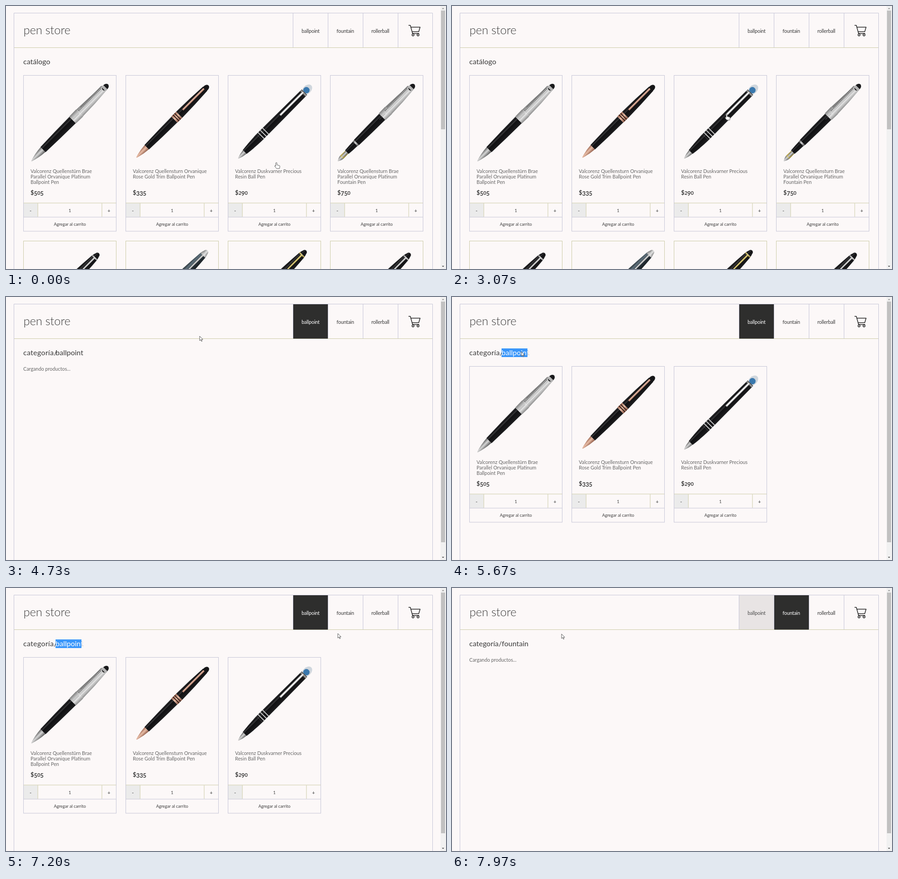
Write an HTML page that moves like this. It is 968 by 578 pixels and loops after 8000 ms.

```html
<!DOCTYPE html>
<html lang="es">
<head>
<meta charset="utf-8">
<title>pen store</title>
<style>
  html, body { margin: 0; width: 100%; height: 100%; overflow: hidden; background: #fcf8f8; }
  svg { display: block; width: 968px; height: 578px; }
  text { font-family: Lato, "Open Sans", sans-serif; fill: #3c3c3c; }
  .logo { font-size: 25.6px; font-weight: 300; letter-spacing: -.1px; }
  .heading { font-size: 16px; }
  .nav { font-size: 11px; letter-spacing: -.25px; text-anchor: middle; }
  .on text { fill: #fff; }
  .body { font-size: 10.8px; fill: #666; }
  .price { font-size: 12.8px; font-weight: 700; }
  .small { font-size: 9.4px; text-anchor: middle; }
  .sign { font-size: 11px; text-anchor: middle; }
  .line { fill: none; stroke: #c5c5d6; }
  .olive { stroke: #cccba6; }

  .anim { animation: 8s linear infinite; }
  .step { animation: 8s step-end infinite; }

  .catalog { animation-name: catalog; }
  .products { animation-name: products; }
  .loading { animation-name: loading; }
  .category { animation-name: category; }
  .selection { animation-name: selection; }
  .fountain-title { animation-name: fountain-title; }
  .ballpoint { animation-name: ballpoint; }
  .fountain { animation-name: fountain; }
  .thumb { animation-name: thumb; }
  .hand { animation-name: hand; }
  .arrow { animation-name: arrow; }
  .cursor { animation: move 8s ease-in-out infinite; }

  @keyframes catalog { 0% { opacity: 1 } 59.125%, 100% { opacity: 0 } }
  @keyframes products { 0%, 63.75% { opacity: 1 } 59.125%, 96.25%, 100% { opacity: 0 } }
  @keyframes loading { 0%, 63.75% { opacity: 0 } 59.125%, 96.25%, 100% { opacity: 1 } }
  @keyframes category { 0%, 96.25%, 100% { opacity: 0 } 59.125% { opacity: 1 } }
  @keyframes selection { 0%, 96.25%, 100% { opacity: 0 } 70% { opacity: 1 } }
  @keyframes fountain-title { 0% { opacity: 0 } 96.25%, 100% { opacity: 1 } }
  @keyframes ballpoint { 0%, 48.69% { opacity: 0 } 52.44%, 96.25% { opacity: 1 } 100% { opacity: 0 } }
  @keyframes fountain { 0%, 91% { opacity: 0 } 94.75%, 100% { opacity: 1 } }
  @keyframes thumb { 0% { height: 261px } 59.125%, 100% { height: 529px } }
  @keyframes hand { 0%, 48.69%, 91% { opacity: 1 } 42.5%, 59.125%, 96.25%, 100% { opacity: 0 } }
  @keyframes arrow { 0%, 48.69%, 91% { opacity: 0 } 42.5%, 59.125%, 96.25%, 100% { opacity: 1 } }
  @keyframes move {
    0% { transform: translate(595px, 344px) }
    7.5% { transform: translate(592px, 338px) }
    12.5%, 25.375% { transform: translate(589px, 333px) }
    34.6%, 35.9% { transform: translate(604px, 262px) }
    45.9%, 46.6% { transform: translate(606px, 70px) }
    49.625% { transform: translate(641px, 53px) }
    52.9%, 55% { transform: translate(664px, 50px) }
    55.4%, 59.12% { transform: translate(661px, 52px) }
    59.125% { transform: translate(426px, 86px) }
    69.1%, 70% { transform: translate(142px, 119px) }
    75.4%, 78.75% { transform: translate(330px, 138px) }
    85.9%, 88.4% { transform: translate(612px, 142px) }
    90% { transform: translate(730px, 100px) }
    92.5%, 95.5% { transform: translate(746px, 50px) }
    99.6%, 100% { transform: translate(241px, 101px) }
  }
</style>
</head>
<body>
<svg viewBox="0 0 968 578">
  <defs>
    <linearGradient id="silver" x2="0" y2="1">
      <stop offset="0" stop-color="#7c7c7c"/><stop offset=".3" stop-color="#bdbdbd"/>
      <stop offset=".6" stop-color="#e4e4e4"/><stop offset="1" stop-color="#8a8a8a"/>
    </linearGradient>
    <linearGradient id="steel" x2="0" y2="1">
      <stop offset="0" stop-color="#5c5c5c"/><stop offset=".45" stop-color="#d6d6d6"/>
      <stop offset="1" stop-color="#555"/>
    </linearGradient>
    <linearGradient id="ink" x2="0" y2="1">
      <stop offset="0" stop-color="#2b2b2d"/><stop offset=".2" stop-color="#141416"/>
      <stop offset=".3" stop-color="#3a3a3c"/><stop offset=".42" stop-color="#101012"/>
      <stop offset="1" stop-color="#1d1d1f"/>
    </linearGradient>
    <linearGradient id="rose" x2="0" y2="1">
      <stop offset="0" stop-color="#9a6450"/><stop offset=".45" stop-color="#e9bda6"/>
      <stop offset="1" stop-color="#8a5644"/>
    </linearGradient>
    <linearGradient id="gold" x2="0" y2="1">
      <stop offset="0" stop-color="#a89440"/><stop offset=".5" stop-color="#e4d68c"/>
      <stop offset="1" stop-color="#877426"/>
    </linearGradient>
    <linearGradient id="marble" x2="0" y2="1">
      <stop offset="0" stop-color="#1e2428"/><stop offset=".3" stop-color="#5f717c"/>
      <stop offset=".55" stop-color="#28333b"/><stop offset="1" stop-color="#16191c"/>
    </linearGradient>
  </defs>

  <rect width="968" height="578" fill="#fcf8f8"/>
  <path class="line" d="M17.500 578V15.500H938.500V578M631.500 16V91M708.500 16V91M785.500 16V91M862.500 16V91"/>
  <path class="line olive" d="M18 91.500H938"/>
  <text class="logo" x="38.500" y="62">pen store</text>
  <text class="nav" x="670" y="58.500">ballpoint</text>
  <text class="nav" x="746.500" y="58.500">fountain</text>
  <text class="nav" x="823.500" y="58.500">rollerball</text>
  <g class="on anim ballpoint">
    <rect x="632" y="16" width="76" height="75.500" fill="#2e2e2d"/>
    <text class="nav" x="670" y="58.500">ballpoint</text>
  </g>
  <g class="on anim fountain">
    <rect x="709" y="16" width="76" height="75.500" fill="#2e2e2d"/>
    <text class="nav" x="746.500" y="58.500">fountain</text>
  </g>
  <g fill="none" stroke="#222" stroke-width="1.500" stroke-linejoin="round">
    <path d="M885.500 42.500H889.500L894.500 60.500H909M890.800 46.500H911L908 56.500H893.500"/>
    <circle cx="895.500" cy="63.500" r="2.200"/><circle cx="906.500" cy="63.500" r="2.200"/>
  </g>

  <text class="heading step catalog" x="38" y="128">catálogo</text>
  <g class="step category">
    <text class="heading" x="38" y="128" letter-spacing=".3">categoría/</text>
    <text class="heading" x="109" y="128">ballpoint</text>
  </g>
  <g class="on step selection">
    <rect x="109" y="113" width="57" height="19" fill="#3a96fa"/>
    <text class="heading" x="109" y="128">ballpoint</text>
  </g>
  <text class="heading step fountain-title" x="38" y="128">categoría/fountain</text>
  <text class="body step loading" x="38" y="162">Cargando productos...</text>

  <g id="products" class="step products"></g>
  <g id="rest" class="step catalog"></g>

  <rect x="956" width="12" height="578" fill="#f1f1f1"/>
  <rect class="step thumb" x="957" y="10" width="9" height="261" fill="#c1c1c1"/>
  <path d="M959 6.500L961.500 4L964 6.500Z" fill="#888"/>
  <path d="M959 571L961.500 573.500L964 571Z" fill="#444"/>

  <g class="cursor" fill="#fff" stroke="#333" stroke-width=".8" stroke-linejoin="round">
    <path class="step hand" d="M-1.500 .8Q-.2 -.8 1.100 .8V5.300L6.100 6.500Q7.700 7 7.500 8.800L6.700 13.200H.2L-3.800 8.200Q-4.200 6.600 -2.600 6.900L-1.500 7.900Z"/>
    <path class="step arrow" d="M0 0V10L2.400 7.800L4.100 11.600L5.600 10.900L3.900 7.300H7.100Z"/>
  </g>
</svg>
<script>
const paint = name => name[0] === '#' ? name : `url(#${name})`;

// A pen lies along the x axis, tip at 0: [start, end, half width at start, at end, paint].
// Sides bulge slightly outwards.
const part = ([a, b, h, k, fill]) => {
  const mid = (a + b) / 2, bulge = .3 * (h + k) / 2 + .7 * Math.max(h, k);
  return `<path d="M${a} ${-h}Q${mid} ${-bulge} ${b} ${-k}V${k}Q${mid} ${bulge} ${a} ${h}Z" fill="${paint(fill)}"/>`;
};
const bar = (a, b, v, width, color, dash = '') =>
  `<path d="M${a} ${v}H${b}" stroke="${color}" stroke-width="${width}" stroke-dasharray="${dash}"/>`;
const dome = (x, rx, ry, color) =>
  `<ellipse cx="${x}" cy="0" rx="${rx}" ry="${ry}" fill="${color}"/>`;
const pen = (x, y, parts, extra = '') =>
  `<g transform="translate(${x} ${y}) rotate(-45)">${parts.map(part).join('')}${extra}</g>`;

const blackEnd = dome(230, 8.5, 6.2, '#1a1a1c');
const engraved = bar(152, 222, -5, 3, '#666', '1.5 2') + bar(152, 222, 0, 1.2, '#999', '1 2') +
  bar(152, 222, 4, 1.2, '#aaa', '1 2') + bar(130, 148, 0, 1, '#888', '1 1') +
  bar(160, 226, -7.5, 2, '#777') + bar(224, 230, 0, 13, '#b4b4b4');

const pens = {
  platinum: pen(17.5, 188.5, [
    [0, 36, .8, 7.5, 'steel'], [36, 128, 8, 10, 'ink'],
    [128, 150, 10.5, 11, 'silver'], [150, 229, 10.5, 6.5, 'silver']], blackEnd + engraved),
  rose: pen(23.5, 180.5, [
    [0, 32, .8, 6.5, 'rose'], [32, 118, 7, 9, 'ink'], [118, 133, 9.5, 9.5, 'rose'],
    [133, 214, 9.5, 6.5, 'ink']],
    bar(122, 130, 0, 19, '#33201b', '2 3') + dome(216, 8, 6, '#161618') +
    bar(146, 212, -2, 4, '#b98470') + bar(148, 212, -2.5, 1.2, '#f0cdbb')),
  resin: pen(22.5, 182.5, [
    [0, 20, .8, 5.5, 'steel'], [20, 66, 6, 9.5, 'ink'], [66, 204, 9.5, 8.5, 'ink']],
    bar(70, 87, 0, 19, '#ccc', '2 5') + dome(214, 13, 9, '#cfd6dd') +
    dome(212, 7, 7, '#3a78ad') + bar(200, 206, 0, 17, '#555') + bar(202, 204, 0, 17, '#aaa') +
    bar(132, 205, -2, 5, '#777') + bar(133, 204, -2, 3.4, '#eee')),
  fountain: pen(16.5, 188.5, [
    [0, 12, .5, 5, 'steel'], [12, 28, 5, 4.5, 'gold'], [14, 28, 2, 3.5, 'steel'],
    [28, 54, 5.5, 7, 'ink'], [54, 58, 7.5, 7.5, 'steel'], [58, 138, 8, 9.5, 'ink'],
    [138, 158, 10.5, 11, 'silver'], [158, 229, 10.5, 6.5, 'silver']], blackEnd + engraved)
};

// Only the cap ends of the second row are in view.
const cap = (x, y, body, trim, tip) => pen(x - 155.6, y + 155.6, [
  [110, 206, 12, 7.5, body], [205, 208, 7.5, 7, trim], [208, 215, 7, 5, tip]],
  dome(214.5, 5.5, 5.2, paint(tip)) + part([140, 206, 1, 2, trim]));
const caps = [
  cap(166, 27, 'ink', 'silver', 'ink'), cap(180, 21, 'marble', 'silver', 'silver'),
  cap(172, 21, 'ink', 'gold', 'ink'), cap(176, 27, 'ink', 'silver', 'ink')];

// Old-style figures: some drop below the baseline, the others are low.
const figures = price => {
  let shift = 0;
  return [...price].map(c => {
    const drop = '34579'.includes(c) ? 2 : 0;
    const span = `<tspan dy="${drop - shift}"${'012'.includes(c) ? ' font-size="11"' : ''}>${c}</tspan>`;
    shift = drop;
    return span;
  }).join('');
};

const card = (column, y, content) =>
  `<g transform="translate(${38.5 + column * 225} ${y})">
    <rect class="line${y > 500 ? ' olive' : ''}" width="204" height="342.5"/>${content}</g>`;

const product = (name, price, art) => `${art}
  ${name.map((row, i) => `<text class="body" x="15.5" y="${214 + i * 12}">${row}</text>`).join('')}
  <text class="price" x="15.5" y="262">${figures(price)}</text>
  <rect x=".5" y="281" width="31" height="30.5" fill="#ebebeb"/>
  <path class="line olive" d="M0 280.500H204M31.500 281V311M172.500 281V311"/>
  <path class="line" d="M0 311.500H204"/>
  <text class="sign" x="15.5" y="301">-</text>
  <text class="small" x="102" y="300">1</text>
  <text class="sign" x="188" y="301">+</text>
  <text class="small" x="102" y="330">Agregar al carrito</text>`;

const items = [
  [['Valcorenz Quellenstürn Brae', 'Parallel Orvanique Platinum', 'Ballpoint Pen'], '$505', pens.platinum],
  [['Valcorenz Quellensturn Orvanique', 'Rose Gold Trim Ballpoint Pen'], '$335', pens.rose],
  [['Valcorenz Duskvarner Precious', 'Resin Ball Pen'], '$290', pens.resin],
  [['Valcorenz Quellensturn Brae', 'Parallel Orvanique Platinum', 'Fountain Pen'], '$750', pens.fountain]
].map((item, i) => card(i, 152.5, product(...item)));

document.getElementById('products').innerHTML = items.slice(0, 3).join('');
document.getElementById('rest').innerHTML =
  items[3] + caps.map((art, i) => card(i, 516.5, art)).join('');
</script>
</body>
</html>
```
